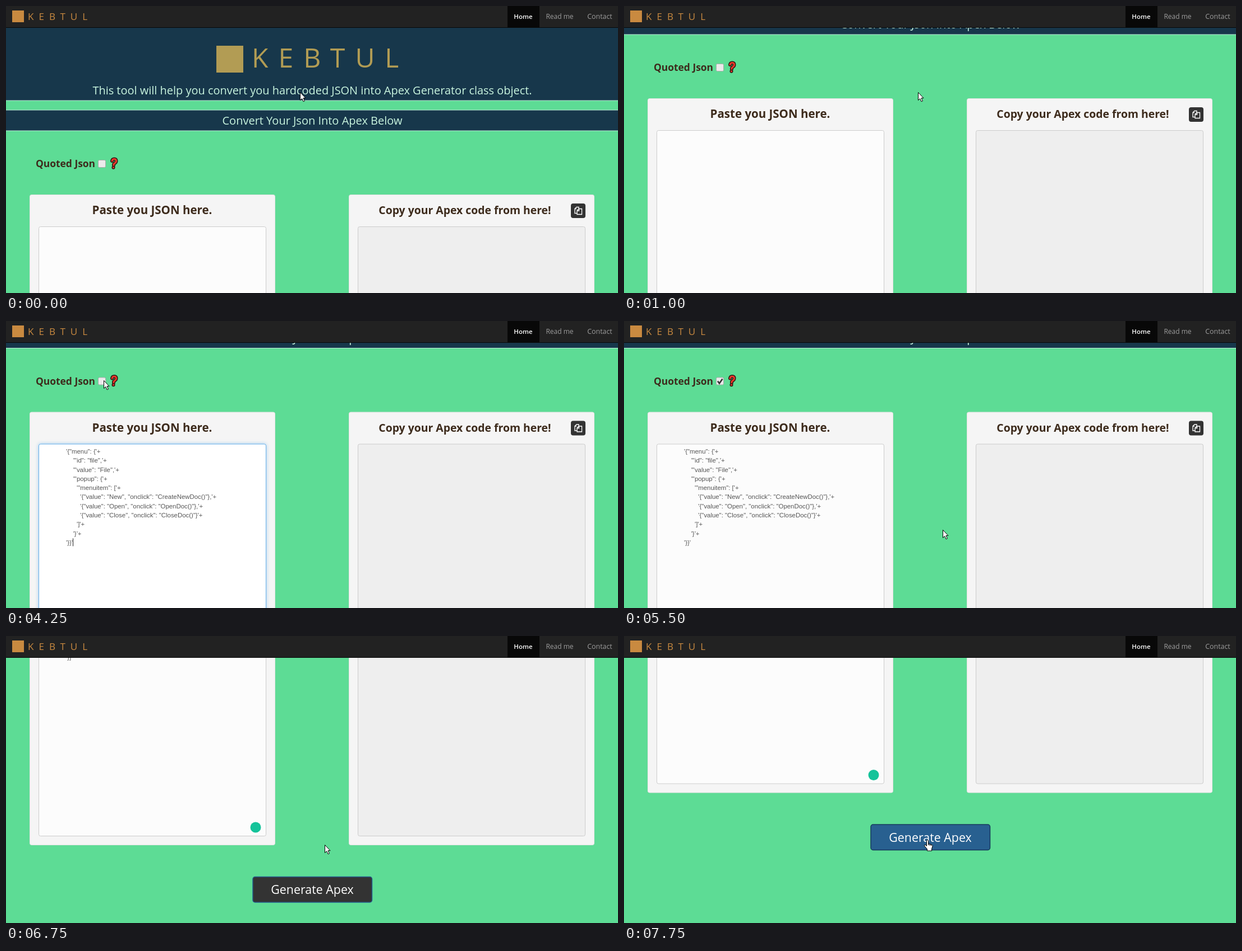
Recreate the animation shown at these times as an HTML page. Size 1091 px wide and 513 px high, loop 8 s.

```html
<!DOCTYPE html>
<html lang="en">
<head>
<meta charset="utf-8">
<title>JSON to Apex converter</title>
<style>
  html, body { margin: 0; width: 100%; height: 100%; overflow: hidden; background: #5ddc95; }
  svg { display: block; width: 1091px; height: 513px; }
  text { font-family: "Open Sans", "Noto Sans", sans-serif; white-space: pre; }
  .code text { font: 11.4px "Liberation Sans", Arial, sans-serif; fill: #555; }
  .bold { font-weight: 700; fill: #3d2b1c; }
  .pale { fill: #c9f5df; }
  .mid { text-anchor: middle; }
  .focus { fill: #fff; stroke: #66afe9; filter: drop-shadow(0 0 3px rgba(102, 175, 233, .6)); }
  .plain { fill: #fcfcfc; stroke: #ccc; }
</style>
</head>
<body>
<svg id="stage" viewBox="0 0 1091 513" xmlns="http://www.w3.org/2000/svg"></svg>
<script>
const LOOP = 8000;
const svg = document.getElementById('stage');

const rect = (x, y, w, h, attrs) => `<rect x="${x}" y="${y}" width="${w}" height="${h}" ${attrs}/>`;
const label = (x, y, size, content, attrs = '') =>
  `<text x="${x}" y="${y}" font-size="${size}" ${attrs}>${content}</text>`;

const codeLines = [
  [0, `'{"menu": {'+`],
  [4, `'"id": "file",'+`],
  [4, `'"value": "File",'+`],
  [4, `'"popup": {'+`],
  [6, `'"menuitem": ['+`],
  [8, `'{"value": "New", "onclick": "CreateNewDoc()"},'+`],
  [8, `'{"value": "Open", "onclick": "OpenDoc()"},'+`],
  [8, `'{"value": "Close", "onclick": "CloseDoc()"}'+`],
  [6, `']'+`],
  [4, `'}'+`],
  [0, `'}}'`],
];
const code = codeLines
  .map(([indent, line], i) => label(107 + indent * 3.17, 411.5 + i * 16.28, 11.4, line))
  .join('');

const brand = (x, y, side, textX, baseline, size, gap, color, ink) =>
  rect(x, y, side, side, `fill="${color}"`) +
  label(textX, baseline, size, 'KEBTUL', `fill="${ink}" letter-spacing="${gap}"`);

const panel = (x, title, titleX, titleSize) =>
  rect(x + .5, 337.5, 437, 568, 'rx="3" fill="#f5f5f5" stroke="#e3e3e3"') +
  label(titleX, 372, titleSize, title, 'class="bold mid"');

const header =
  rect(0, 0, 1091, 169, 'fill="#17374b"') +
  rect(0, 186, 1091, 37, 'fill="#17374b"') +
  [169, 186, 223].map(y => rect(0, y - .5, 1091, 1, 'fill="#bfeeda"')).join('') +
  brand(375, 71, 48, 438, 110, 48, 18, '#b29c54', '#b29c54') +
  label(546, 158, 19.95, 'This tool will help you convert you hardcoded JSON into Apex Generator class object.', 'class="pale mid"') +
  label(546, 212, 20, 'Convert Your Json Into Apex Below', 'class="pale mid"');

const option =
  label(53, 288, 17.4, 'Quoted Json', 'class="bold"') +
  rect(164.5, 275.5, 13, 13, 'rx="2" fill="#ebebeb" stroke="#aaa"') +
  '<path id="check" d="M167 282l3 4 5.500-8" fill="none" stroke="#333" stroke-width="2.600"/>' +
  [['#2b1512', 6], ['#e8392b', 3]].map(([color, width]) =>
    `<path d="M189 277q.5-3.500 4-3.500t3.500 3.500q0 2.500-2.500 4t-2 3.500M191.500 288.500v.2" fill="none"
      stroke="${color}" stroke-width="${width}" stroke-linecap="round" stroke-linejoin="round"/>`).join('');

const copyButton =
  rect(1007, 353, 26, 26, 'rx="4" fill="#333"') +
  `<path d="M1017 362.500h-3v8h4M1014 362.500l3-3h4v3M1018 365.500l3-3h5.500v10h-8.500zM1021.500 362.500v3.500h-3.500"
    fill="none" stroke="#fff" stroke-width="1.300"/>`;

const page = header + option +
  panel(42, 'Paste you JSON here.', 260.5, 20.5) +
  panel(611, 'Copy your Apex code from here!', 818, 19.4) +
  rect(58.5, 394.5, 405, 495, 'id="input" rx="3"') +
  rect(627.5, 394.5, 405, 495, 'rx="3" fill="#eee" stroke="#ccc"') +
  copyButton +
  `<g id="code" class="code">${code}<path id="caret" d="M119.500 563v14" stroke="#222"/></g>` +
  '<circle id="helper" cx="445" cy="874" r="9.500" fill="#15c39a"/>' +
  rect(440, 962.5, 212.5, 45.5, 'id="button" rx="4" stroke-width="1.500"') +
  label(546, 993, 21.4, 'Generate Apex', 'fill="#fff" class="mid"');

const nav =
  rect(0, 0, 1091, 39, 'fill="#222"') +
  rect(0, 38, 1091, 1, 'fill="#080808"') +
  rect(894, 0, 57, 38, 'fill="#080808"') +
  brand(11, 8, 21, 39, 24.5, 17, 9, '#c98a40', '#c98a40') +
  label(922, 23, 11.5, 'Home', 'fill="#fff" font-weight="600" class="mid"') +
  label(987, 23, 12, 'Read me', 'fill="#9d9d9d" class="mid"') +
  label(1058.5, 23, 12.4, 'Contact', 'fill="#9d9d9d" class="mid"');

const pointers = `
  <g id="arrow"><path d="M.5.500v14l3.200-3 2.400 5.300 2.300-1-2.400-5.200h4z" fill="#fff" stroke="#000"/></g>
  <g id="beam"><path d="M-3-8q3 0 3 2v12q0 2-3 2M3-8q-3 0-3 2M0 6q0 2 3 2" fill="none" stroke="#222"/></g>
  <g id="hand"><path d="M-1.500 1.500q1.500-2 3 0v6l6 1.500q1.500.5 1.500 2.500l-1.500 5.500v3h-8v-3l-5-6q0-2.500 2-1.500l2 2z"
    fill="#fff" stroke="#000" stroke-linejoin="round"/><path d="M1.500 7v3M4 8v3M6.500 9v2" stroke="#000"/></g>`;

svg.innerHTML = `<g id="page">${page}</g>${nav}${pointers}`;
const el = id => document.getElementById(id);

// Tracks hold [start time, ...value]; each value stays until the next start.
const scrollTrack = [
  [0, 0], [250, 66], [500, 87], [1000, 172], [1250, 174], [1500, 174.5],
  [5750, 532], [7000, 590], [7250, 625.5],
];
const pointerTrack = [
  [0, 'arrow', 524, 154], [1250, 'arrow', 500, 200], [1500, 'beam', 330, 310],
  [2500, 'none', 0, 0], [3250, 'beam', 300, 318], [3500, 'beam', 262, 262],
  [3750, 'arrow', 210, 160], [4000, 'arrow', 180, 115], [4250, 'arrow', 174, 106],
  [5000, 'arrow', 290, 190], [5250, 'arrow', 500, 340], [5500, 'arrow', 568, 373],
  [7250, 'hand', 568, 373], [7500, 'hand', 552, 368], [7750, 'hand', 541, 364],
];
const valueAt = (track, t) => track.findLast(([start]) => start <= t).slice(1);
const within = (t, from, to = LOOP) => t >= from && t < to;
const show = (id, on) => el(id).setAttribute('visibility', on ? 'inherit' : 'hidden');

function render(t) {
  const [scroll] = valueAt(scrollTrack, t);
  el('page').setAttribute('transform', `translate(0 ${-scroll})`);

  el('input').setAttribute('class', within(t, 2000, 4750) ? 'focus' : 'plain');
  show('code', t >= 2500);
  show('caret', within(t, 2500, 3250) || within(t, 3750, 4750));
  show('check', t >= 4750);
  show('helper', t >= 6000);

  const hovered = t >= 7250;
  el('button').setAttribute('fill', hovered ? '#286090' : '#333');
  el('button').setAttribute('stroke', hovered ? '#163a5c' : '#24598a');

  const [kind, x, y] = valueAt(pointerTrack, t);
  for (const id of ['arrow', 'beam', 'hand']) {
    show(id, id === kind);
    el(id).setAttribute('transform', `translate(${x} ${y})`);
  }
}

function tick() {
  render(performance.now() % LOOP);
  requestAnimationFrame(tick);
}
tick();
</script>
</body>
</html>
```
